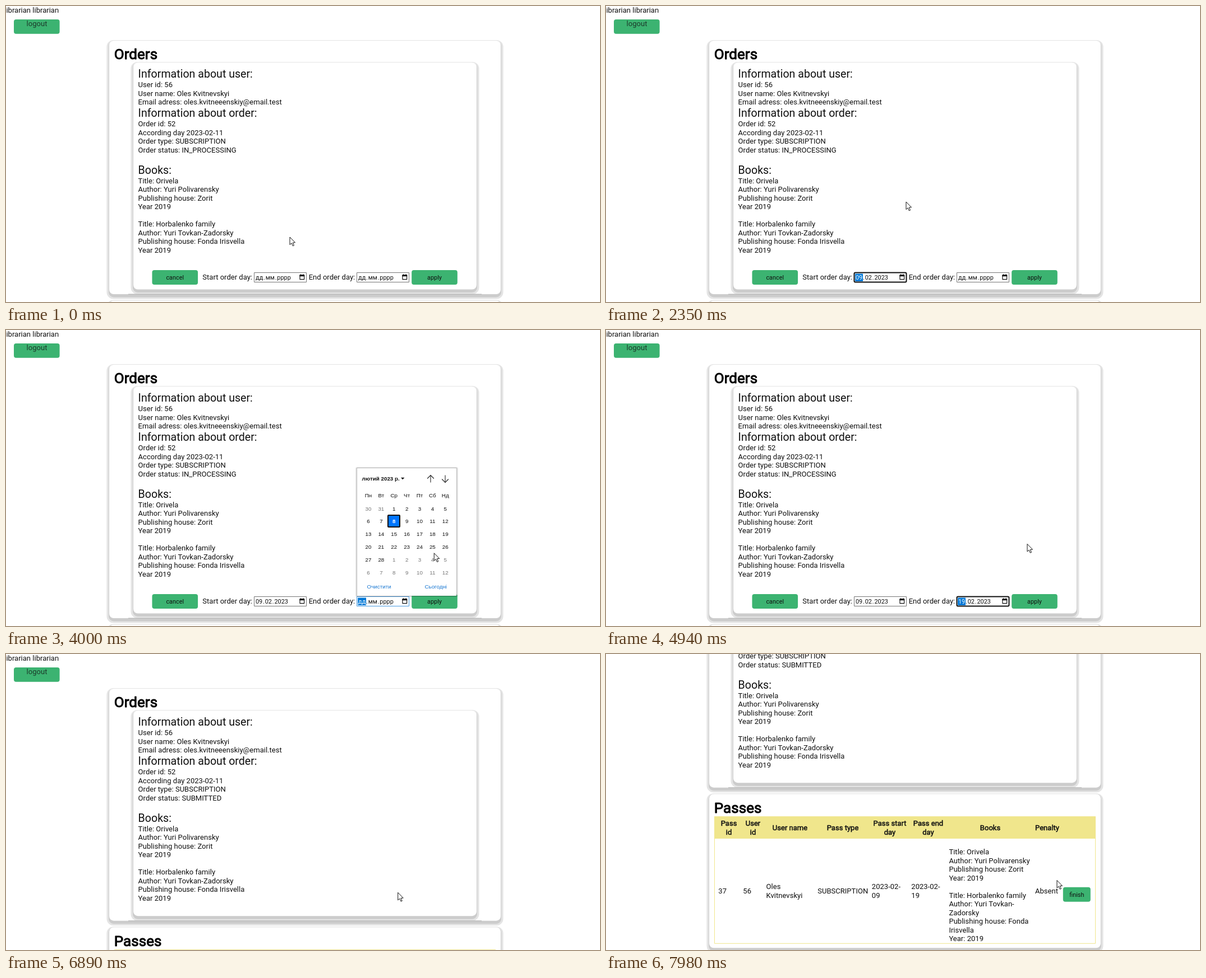
Recreate the animation shown at these times as an HTML page with a canvas. Size 1059 by 529 pixels, loop 8 s.

```html
<!DOCTYPE html>
<html lang="en">
<head>
<meta charset="utf-8">
<title>Orders</title>
<style>
html, body { margin: 0; width: 100%; height: 100%; overflow: hidden; background: #fff; }
canvas { display: block; }
</style>
</head>
<body>
<canvas id="stage" width="1059" height="529"></canvas>
<script>
const ctx = document.getElementById('stage').getContext('2d');
const LOOP = 8000;
const UI = 'Roboto, sans-serif';
const PICKER = '"Liberation Sans", Arial, sans-serif';
const BODY = 13.06, TITLE = 26.1, HEAD = 19.6, SMALL = 10.9, LINE = 15.52;
const INK = '#101010', GREEN = '#3cb371', KHAKI = '#f0e68c', BLUE = '#0078d7';

const reader = ['Oles', 'Kvitnevskyi'];
const email = 'oles.kvitneeenskiy@email.test';
const books = [
  { title: 'Orivela', author: ['Yuri Polivarensky'], house: ['Zorit'] },
  { title: 'Horbalenko family', author: ['Yuri Tovkan-', 'Zadorsky'], house: ['Fonda', 'Irisvella'] }
];

// The screen refreshes in bursts: [first, last, count]
const bursts = [
  [150, 1170, 8], [1450, 2350, 8], [2500, 3430, 8], [3580, 4520, 7], [4670, 5600, 8],
  [5750, 6050, 3], [6610, 6610, 1], [6890, 7160, 3], [7310, 7310, 1], [7590, 7980, 4]
];
const ticks = [0];
for (const [from, to, n] of bursts)
  for (let i = 0; i < n; i++)
    ticks.push(from + (n > 1 ? Math.floor((to - from) * i / (n - 1) / 10) * 10 : 0));

// Pointer path: [time, x, y]
const path = [
  [0, 506, 413], [900, 529, 485], [1450, 529, 485], [2000, 533, 345], [2350, 535, 350],
  [3020, 715, 484], [3170, 715, 484], [4200, 784, 362], [4670, 790, 367], [4940, 749.5, 383],
  [5600, 714, 482], [6050, 757, 481], [6610, 757, 481], [7160, 642.5, 373.5],
  [7310, 642.5, 373.5], [7590, 675, 367], [7720, 740, 369], [7980, 804, 404.5]
];

function pointerAt(t) {
  let i = 1;
  while (i < path.length - 1 && path[i][0] < t) i++;
  const [t0, x0, y0] = path[i - 1], [t1, x1, y1] = path[i];
  const k = Math.min(1, (t - t0) / (t1 - t0));
  return [x0 + (x1 - x0) * k, y0 + (y1 - y0) * k];
}

function text(str, x, y, { size = BODY, color = INK, align = 'left', font = UI, weight = 400, heavy = false } = {}) {
  ctx.font = `${weight} ${size}px ${font}`;
  ctx.textAlign = align;
  ctx.fillStyle = color;
  ctx.fillText(str, x, y);
  if (heavy) {
    ctx.strokeStyle = color;
    ctx.lineWidth = size / 27;
    ctx.lineJoin = 'round';
    ctx.strokeText(str, x, y);
  }
}

function lines(list, x, y, opts) {
  list.forEach((s, i) => text(s, x, y + i * LINE, opts));
}

function box(x, y, w, h, r, color) {
  ctx.fillStyle = color;
  ctx.beginPath();
  ctx.roundRect(x, y, w, h, r);
  ctx.fill();
}

function frame(x, y, w, h, width, color, r = 0) {
  ctx.strokeStyle = color;
  ctx.lineWidth = width;
  ctx.beginPath();
  ctx.roundRect(x, y, w, h, r);
  ctx.stroke();
}

function stroke(color, width, ...points) {
  ctx.strokeStyle = color;
  ctx.lineWidth = width;
  ctx.lineJoin = 'miter';
  ctx.beginPath();
  points.forEach(([x, y]) => ctx.lineTo(x, y));
  ctx.stroke();
}

function card(x, y, w, h) {
  box(x - 4.5, y - 1, w + 9, h + 9.5, 12, '#e4e4e4');
  box(x - 1, y, w + 2, h + 5.5, 9, '#cccccc');
  box(x, y, w, h, 8, '#fff');
}

function button(label, cx, cy, w = 81.6, scale = 1) {
  ctx.save();
  ctx.translate(cx, cy);
  ctx.scale(scale, scale);
  box(-w / 2, -13, w, 26, 4, GREEN);
  text(label, 0, 4, { size: SMALL, align: 'center' });
  ctx.restore();
}

function dateField(x, value, focus, open) {
  box(x, 476, 94, 18, 0, '#fff');
  if (open) frame(x + .5, 476.5, 93, 17, 1, '#4a9be0');
  else if (focus) frame(x + .5, 476.5, 93, 17, 2, '#101010', 2);
  else frame(x + .5, 476.5, 93, 17, 1, '#767676');

  let tx = x + 3;
  ctx.font = `400 ${SMALL}px ${UI}`;
  value.split('.').forEach((part, i) => {
    if (i) {
      text('.', tx, 489, { size: SMALL });
      tx += ctx.measureText('.').width + .8;
    }
    const w = ctx.measureText(part).width, lit = focus && !i;
    if (lit) box(tx - .8, 478.5, w + 1.6, 13.5, 0, BLUE);
    text(part, tx, 489, { size: SMALL, color: lit ? '#fff' : INK });
    tx += w + .8;
  });

  frame(x + 82, 481, 7.6, 7.6, 1.2, '#111');
  box(x + 81.4, 480.4, 8.8, 2.8, 0, '#111');
  box(x + 83, 479.2, 1.2, 2, 0, '#111');
  box(x + 87.4, 479.2, 1.2, 2, 0, '#111');
}

function picker(x) {
  const opt = { size: 9.8, font: PICKER, color: '#101010' };
  const mid = { ...opt, align: 'center' };
  box(x - 3, 245, 183, 232, 3, 'rgba(0, 0, 0, .1)');
  box(x - 1, 246, 179, 230, 1, 'rgba(0, 0, 0, .2)');
  box(x, 247, 177, 228, 0, '#fff');

  text('лютий 2023 р.', x + 8.6, 268.7, { ...opt, weight: 700 });
  ctx.beginPath();
  ctx.moveTo(x + 78, 263.7);
  ctx.lineTo(x + 84.4, 263.7);
  ctx.lineTo(x + 81.2, 267.2);
  ctx.fill();
  for (const [cx, d] of [[131, -1], [157, 1]]) {
    const ax = x + cx, tip = 266 + d * 6.5;
    stroke('#222', 1.1, [ax, 266 - d * 6.5], [ax, tip]);
    stroke('#222', 1.1, [ax - 5.8, tip - d * 6], [ax, tip], [ax + 5.8, tip - d * 6]);
  }

  const step = 22.87, left = x + 20;
  'Пн Вт Ср Чт Пт Сб Нд'.split(' ').forEach((d, i) => text(d, left + i * step, 299, mid));
  for (let i = 0; i < 42; i++) {
    const cx = left + i % 7 * step, cy = 319 + Math.floor(i / 7) * step;
    const day = i < 2 ? 30 + i : (i - 2) % 28 + 1;
    const inside = i > 1 && i < 30, today = i === 9;
    if (today) {
      const bx = Math.round(cx - 11.5), by = Math.round(cy - 11.5);
      box(bx, by, 23, 23, 2, '#101010');
      box(bx + 2, by + 2, 19, 19, 0, '#0075ff');
    }
    text(day, cx, cy + 3.5, {
      ...mid,
      weight: today ? 700 : 400,
      color: today ? '#fff' : inside ? '#101010' : '#757575'
    });
  }
  text('Очистити', x + 17.6, 462, { ...opt, color: '#1a78d2' });
  text('Сьогодні', x + 160, 462, { ...opt, color: '#1a78d2', align: 'right' });
}

function ordersCard(done) {
  const cut = done ? 38.3 : 0;
  card(184, 62, 698, 453 - cut);
  text('Orders', 192.7, 95.3, { size: TITLE, heavy: true, color: '#000' });
  card(227, 101, 612, 405.5 - cut);
  box(218, 514.6 - cut, 630, 1.2, 0, '#b8b8b8');

  const x = 235.6;
  const big = { size: HEAD };
  text('Information about user:', x, 128, big);
  lines(['User id: 56', 'User name: ' + reader.join(' '), 'Email adress: ' + email], x, 145.3);
  text('Information about order:', x, 198.3, big);
  lines([
    'Order id: 52', 'According day 2023-02-11', 'Order type: SUBSCRIPTION',
    'Order status: ' + (done ? 'SUBMITTED' : 'IN_PROCESSING')
  ], x, 215.3);
  text('Books:', x, 299.7, big);
  books.forEach((b, i) => lines([
    'Title: ' + b.title,
    'Author: ' + b.author.join(''),
    'Publishing house: ' + b.house.join(' '),
    'Year 2019'
  ], x, 316.6 + i * 5 * LINE));
}

function passesCard(top) {
  ctx.save();
  ctx.translate(0, top);
  card(184, 0, 698, 275);
  text('Passes', 192.7, 33.3, { size: TITLE, heavy: true, color: '#000' });
  frame(193.5, 40.5, 679, 226.5, 1, KHAKI);
  box(193, 40, 680, 39.7, 0, KHAKI);

  const heads = [
    ['Pass|id', 219], ['User|id', 262], ['User name', 328], ['Pass type', 422],
    ['Pass start|day', 506], ['Pass end|day', 574.5], ['Books', 685], ['Penalty', 786.5]
  ];
  for (const [label, cx] of heads) {
    const rows = label.split('|');
    lines(rows, cx, 64.7 - (rows.length - 1) * LINE / 2, { align: 'center', heavy: true });
  }

  const cells = [
    [['37'], 200.3], [['56'], 244.3], [reader, 285.6], [['SUBSCRIPTION'], 377.2],
    [['2023-02-', '09'], 473.8], [['2023-02-', '19'], 544.3], [['Absent'], 765]
  ];
  for (const [rows, x] of cells) lines(rows, x, 177.8 - (rows.length - 1) * LINE / 2);

  const list = [];
  for (const { title, author, house } of books) {
    if (list.length) list.push('');
    list.push('Title: ' + title, 'Author: ' + author[0], ...author.slice(1),
      'Publishing house: ' + house[0], ...house.slice(1), 'Year: 2019');
  }
  lines(list, 611.4, 107.8);
  button('finish', 839.3, 179.5, 49);
  ctx.restore();
}

function orderForm(t) {
  const blank = 'дд.мм.рррр';
  const openStart = t >= 1020 && t < 2220, openEnd = t >= 3020 && t < 4520;
  button('cancel', 301.3, 485);
  text('Start order day:', 350.3, 489.2);
  dateField(442, t >= 2220 ? '09.02.2023' : blank, t >= 1020 && t < 3020, openStart);
  text('End order day:', 539.7, 489.2);
  dateField(625, t >= 4670 ? '19.02.2023' : blank, t >= 3020 && t < 5900, openEnd);
  button('apply', 764, 485, 81.6, t >= 5750 ? 1.1 : 1);
  if (openStart) picker(443);
  if (openEnd) picker(626);
}

function pointer(x, y) {
  const shape = [[0, 0], [0, 13.6], [3.1, 10.8], [5.3, 15.8], [7.5, 14.9], [5.3, 10], [9.5, 9.8]];
  ctx.beginPath();
  shape.forEach(([dx, dy]) => ctx.lineTo(x + dx, y + dy));
  ctx.closePath();
  ctx.fillStyle = '#fff';
  ctx.fill();
  ctx.strokeStyle = '#111';
  ctx.lineWidth = 1;
  ctx.lineJoin = 'miter';
  ctx.stroke();
}

function draw(now) {
  const time = now % LOOP;
  const t = ticks.filter(v => v <= time).pop();
  const done = t >= 6610;
  const scroll = t >= 7310 ? 238 : t >= 7160 ? 43.5 : 0;

  ctx.fillStyle = '#fff';
  ctx.fillRect(0, 0, 1059, 529);
  ctx.save();
  ctx.translate(0, -scroll);
  text('ibrarian librarian', .4, 12.4);
  box(14, 24, 81.6, 25.7, 4, GREEN);
  text('logout', 55, 36, { align: 'center', color: '#1c3a2a' });
  ordersCard(done);
  passesCard(done ? 488.3 : 526.6);
  if (!done) orderForm(t);
  ctx.restore();
  pointer(...pointerAt(t));
}

const start = performance.now();
(function tick() {
  draw(performance.now() - start);
  requestAnimationFrame(tick);
})();
</script>
</body>
</html>
```
